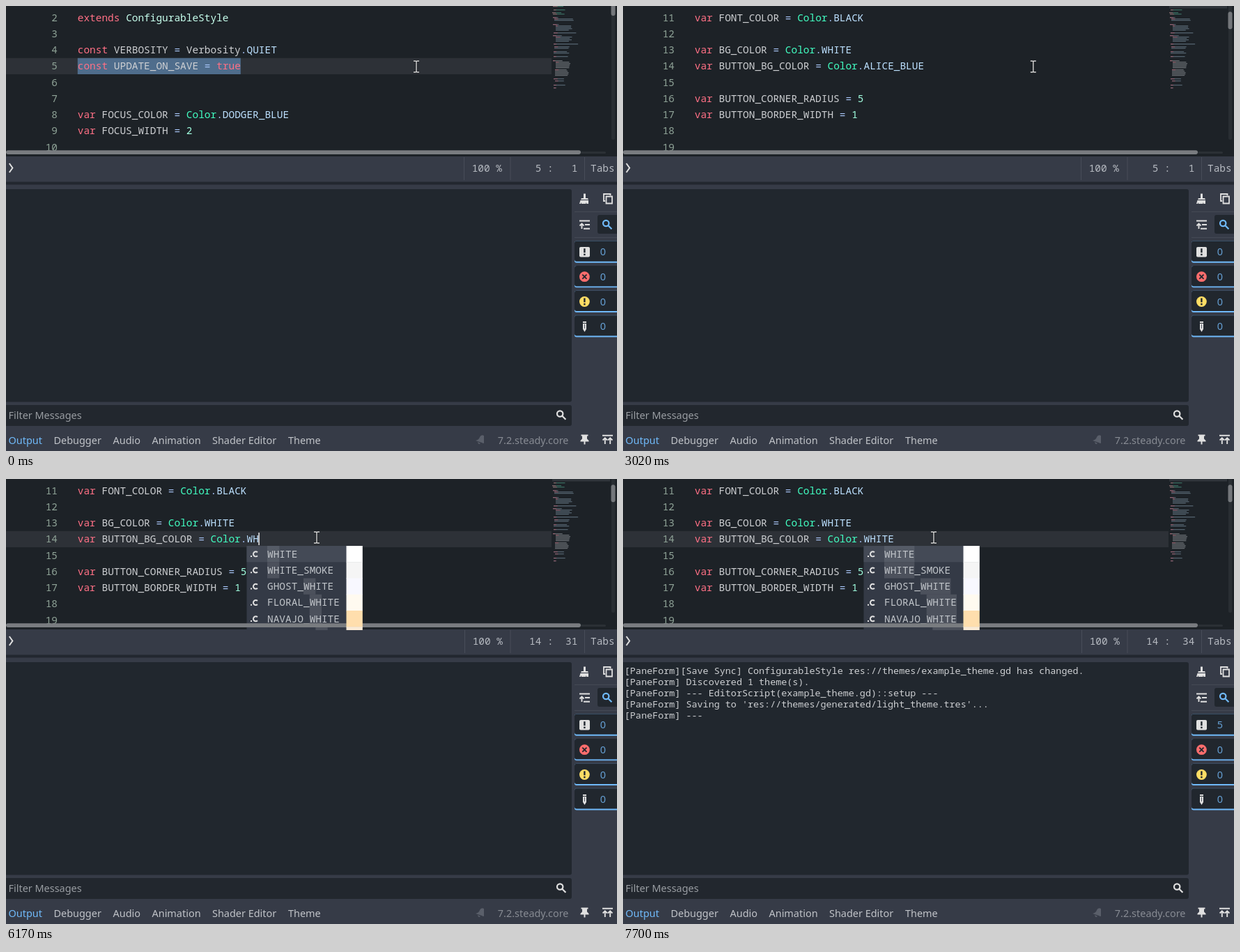
These frames come from a looping animation (877x639 px, 8 s). An HTML page with a canvas:

```html
<!DOCTYPE html>
<html lang="en">
<head>
<meta charset="utf-8">
<title>Theme editor</title>
<style>
html, body { margin: 0; width: 100%; height: 100%; overflow: hidden; background: #363d4a; }
canvas { display: block; }
</style>
</head>
<body>
<canvas id="stage" width="877" height="639"></canvas>
<script>
const ctx = document.getElementById('stage').getContext('2d');
const LOOP = 8000, ROW = 23.25, CHAR = 8.667, CODE_X = 102.8;
const MONO = '"Noto Sans Mono", "DejaVu Sans Mono", monospace';
const CODE = '14.445px ' + MONO, LOG = '13.41px ' + MONO;
const UI = '14.45px "Noto Sans", "Open Sans", sans-serif';
const BASE = '#363b47', EDITOR = '#1d2227', DARK = '#21272e', LINE = '#2d3137';
const TEXT = '#cdcfd2', BLUE = '#70bafa', WHITE = '#e0e0e0';

const SOURCE = [
  '@tool', 'extends ConfigurableStyle', '',
  'const VERBOSITY = Verbosity.QUIET', 'const UPDATE_ON_SAVE = true', '', '',
  'var FOCUS_COLOR = Color.DODGER_BLUE', 'var FOCUS_WIDTH = 2', '',
  'var FONT_COLOR = Color.BLACK', '',
  'var BG_COLOR = Color.WHITE', 'var BUTTON_BG_COLOR = Color.', '',
  'var BUTTON_CORNER_RADIUS = 5', 'var BUTTON_BORDER_WIDTH = 1', '', '', ''
];
const EDITED = 14;
const MESSAGES = [
  '[PaneForm][Save Sync] ConfigurableStyle res://themes/example_theme.gd has changed.',
  '[PaneForm] Discovered 1 theme(s).',
  '[PaneForm] --- EditorScript(example_theme.gd)::setup ---',
  "[PaneForm] Saving to 'res://themes/generated/light_theme.tres'...",
  '[PaneForm] ---'
];
const OPTIONS = [
  ['WHITE', '#ffffff'], ['WHITE_SMOKE', '#f5f5f5'], ['GHOST_WHITE', '#f8f8ff'],
  ['FLORAL_WHITE', '#fffaf0'], ['NAVAJO_WHITE', '#ffdead'], ['ANTIQUE_WHITE', '#faebd7']
];
// Minimap blocks: first y, last y, x, width
const BLOCKS = [
  [0, 1, 785, 20], [5, 6, 786, 20], [9, 9, 784, 14], [11, 12, 785, 20], [16, 16, 785, 8],
  [18, 21, 787, 29], [26, 26, 785, 10], [28, 35, 789, 24], [38, 38, 786, 33],
  [42, 42, 785, 14], [44, 50, 789, 24], [54, 54, 786, 41], [58, 60, 787, 22],
  [65, 67, 786, 25], [72, 73, 786, 24], [78, 78, 785, 14], [80, 88, 789, 23],
  [91, 99, 788, 20], [104, 105, 786, 17], [107, 108, 788, 13], [113, 114, 786, 18], [117, 117, 786, 4]
];

function rect(x, y, w, h, color, radius = 0) {
  ctx.fillStyle = color;
  ctx.beginPath();
  ctx.roundRect(x, y, w, h, radius);
  ctx.fill();
}

function text(str, x, y, color = TEXT, font = CODE, align = 'left') {
  ctx.font = font;
  ctx.fillStyle = color;
  ctx.textAlign = align;
  ctx.fillText(str, x, y);
}

function disc(x, y, r, color) {
  rect(x - r, y - r, 2 * r, 2 * r, color, r);
}

function stroke(path, color = WHITE, width = 2) {
  ctx.strokeStyle = color;
  ctx.lineWidth = width;
  ctx.stroke(new Path2D(path));
}

function fill(path, color = WHITE) {
  ctx.fillStyle = color;
  ctx.fill(new Path2D(path));
}

function clipped(w, h, draw) {
  ctx.save();
  ctx.beginPath();
  ctx.rect(0, 0, w, h);
  ctx.clip();
  draw();
  ctx.restore();
}

function tokenColor(token, prev) {
  if (/^(const|var|extends|true)$/.test(token)) return '#ff7085';
  if (prev === '@' || token === '@') return '#ffb373';
  if (prev === '.') return '#bce0ff';
  if (token === 'Color') return '#42ffc2';
  if (token === 'ConfigurableStyle') return '#c7ffed';
  if (/^\d+$/.test(token)) return '#a1ffe0';
  return /\w/.test(token) ? TEXT : '#abc9ff';
}

function codeLine(str, y) {
  let x = CODE_X, prev = '';
  for (const token of str.match(/\w+|\s+|[^\w\s]/g) || []) {
    text(token, x, y, tokenColor(token, prev));
    x += token.length * CHAR;
    prev = token;
  }
}

function typedWord(t) {
  const steps = [[6310, 'WHITE'], [6240, 'WHI'], [6170, 'WH'], [5840, 'W'], [5450, '']];
  const step = steps.find(([at]) => t >= at);
  return step ? step[1] : 'ALICE_BLUE';
}

function caretOn(t) {
  return t >= 4440 && t < 4850 || t >= 5380 && t < 6770 || t >= 7170 && t < 7700;
}

function minimap(top) {
  let seed = 7;
  const random = () => (seed = seed * 16807 % 2147483647) / 2147483647;
  ctx.globalAlpha = 0.5;
  for (const [y0, y1, x, w] of BLOCKS) {
    for (let y = y0; y <= y1; y += 2) {
      const len = w * (0.75 + 0.25 * random()), head = 3 + 4 * random();
      rect(x, y, len, 1.2, y < 13 ? '#58b89b' : y > 77 && y < 100 ? '#b5bac0' : '#8ba4b8');
      if (y === y0) rect(x, y, Math.min(head, len), 1.2, '#d2667a');
    }
  }
  ctx.globalAlpha = 1;
  if (top === 11) rect(784, 0, 83, 3.5, '#30353b');
}

function popup(word) {
  rect(345.5, 96, 166, 121, '#343a46');
  rect(345.5, 96, 143, ROW, '#444a56');
  OPTIONS.forEach(([name], i) => {
    const y = 96 + i * ROW;
    rect(375 + name.indexOf(word) * CHAR, y, word.length * CHAR, ROW, i ? '#4c515c' : '#555b66');
    text(name, 375, y + 16.6, '#c0c4c9');
    rect(351, y + 14, 2, 2, WHITE);
    ctx.lineWidth = 2;
    ctx.strokeStyle = WHITE;
    ctx.beginPath();
    ctx.arc(358.5, y + 11.8, 3.5, 0.8, Math.PI * 2 - 0.8);
    ctx.stroke();
  });
}

function swatches() {
  OPTIONS.forEach(([, color], i) => rect(488.5, 96 + i * ROW, 23.3, ROW + 0.5, color));
}

function editor(t) {
  const top = t < 1260 ? 2 : t < 1660 ? 5 : t < 2060 ? 8 : 11;
  const editing = t >= 4440, listOpen = t >= 5970, word = typedWord(t);
  const rowY = n => 5.1 + (n - top) * ROW;
  rect(0, 0, 877, 216, EDITOR);
  rect(0, rowY(editing ? EDITED : 5), 783, ROW, LINE);
  if (!editing) rect(CODE_X, rowY(5), 27 * CHAR, ROW, '#4f6d8c');
  for (let n = top - 1; n < top + 9; n++) {
    const y = rowY(n) + 16.6;
    text(String(n), 74, y, '#8fa397', CODE, 'right');
    codeLine(SOURCE[n - 1] + (n === EDITED ? word : ''), y);
  }
  if (caretOn(t)) rect(CODE_X + (28 + word.length) * CHAR - 0.5, 77, 1.6, 18, WHITE);
  minimap(top);
  rect(869, -5, 5, 197, '#292e33', 2.5);
  rect(868.5, -11 + (top - 2) * 2.13, 6, 25, '#74777b', 3);
  if (listOpen) popup(word);
  rect(825, 209, 36, 3, '#2b3035', 1.5);
  rect(0, 207.3, 825, 5.6, '#797c80', 2.8);
  if (listOpen) swatches();
}

function status(t) {
  const editing = t >= 4440, shift = editing ? 1 : 0;
  const column = editing ? 29 + typedWord(t).length : 1;
  stroke('M4.8 226 L9.4 232.5 L4.8 239', WHITE, 2);
  for (const x of [657 + shift, 723.5, 830]) rect(x, 217, 1, 33, '#484d59');
  text('100 %', 668.7 + shift, 237.8, '#b6bac1');
  text((editing ? '14' : ' 5') + ' : ' + String(column).padStart(3), 751, 237.8, '#b6bac1');
  text('Tabs', 839, 237.8, '#b6bac1');
  rect(0, 252.5, 877, 4, '#22272f');
}

function magnifier(x, y, color) {
  stroke(`M${x - 6} ${y - 1.5} a4.2 4.2 0 1 0 8.4 0 a4.2 4.2 0 1 0 -8.4 0 M${x + 1.4} ${y + 1.7} l5 5`, color, 2.2);
}

function toolIcons() {
  fill('M829 269.5 h3 v6.5 h3 l1 2 h-11 l1-2 h3z M824.5 279 h11.5 v5 h-2.5 l-1-2 v2 h-6.5 l-1-2 v2 h-2z');
  stroke('M860 280 h-2 v-10 h9.5 v2', WHITE, 1.8);
  stroke('M861.5 273.5 h8.5 v10 h-8.5z', WHITE, 1.8);
  stroke('M823 308.5 h15 M831 314 h7 M829 319.7 h9 M826.5 320 v-7 M823.5 315.5 l3 -3 l3 3', WHITE, 1.9);
  rect(849, 300, 32, 27, DARK, 3);
  magnifier(863, 313.5, BLUE);
  rect(816, 295, 61, 1, '#454a55');
  rect(816, 332, 61, 1, '#454a55');
}

function counters(t) {
  for (let i = 0; i < 4; i++) {
    const y = 353 + i * 35.6;
    rect(816, y - 15.5, 70, 31.2, BLUE, 3);
    rect(816, y - 15.5, 70, 29.3, DARK, 3);
    text(i === 0 && t >= 7430 ? '5' : '0', 857, y + 5.4, '#659fd3', UI, 'center');
  }
  const bang = (y, color) => {
    rect(829.2, y - 5, 2.4, 6, color);
    rect(829.2, y + 2.5, 2.4, 2.4, color);
  };
  rect(823, 346, 15, 14.5, WHITE, 2);
  bang(353.2, DARK);
  disc(830.4, 388.7, 7.4, '#ff6d6d');
  stroke('M827.3 385.6 l6.2 6.2 m0 -6.2 l-6.2 6.2', DARK, 1.9);
  disc(830.4, 424.5, 7.4, '#ffdd65');
  bang(424.5, DARK);
  fill('M828 453 h5 v2 h-5z M828 456 h5 v8 l-2.5 4 l-2.5 -4z');
  rect(830, 457, 1, 6, '#555b66');
}

function panel(t) {
  rect(0, 263, 812, 305.5, DARK, [0, 3, 3, 0]);
  if (t >= 7430) MESSAGES.forEach((line, i) => text(line, 2, 280 + i * 16, TEXT, LOG));
  toolIcons();
  counters(t);
  rect(0, 573, 812, 30, '#22272e', [0, 3, 3, 0]);
  text('Filter Messages', 3.5, 592.8, '#989ca1', UI);
  magnifier(797, 587, WHITE);
  const tabs = [['Output', 3.5], ['Debugger', 68.5], ['Audio', 153.5], ['Animation', 209.5], ['Shader Editor', 296], ['Theme', 405]];
  tabs.forEach(([name, x], i) => text(name, x, 628.6, i ? '#c0c3c8' : BLUE, UI));
  fill('M674 624 q5 -1 6 -5 q2 -4 6 -2 l0 10 q0 2 -3 0 z M677 626 l4 2 q-3 3 -4 -2z', '#5a5f6a');
  text('7.2.steady.core', 807.5, 628.6, '#878b93', UI, 'right');
  fill('M825.5 615.5 h10 v2 h-1.5 v4 l2.5 2.5 v1.5 h-5 v4 h-2 v-4 h-5 v-1.5 l2.5 -2.5 v-4 h-1.5z');
  stroke('M856 616.8 h15 M859.8 629 v-8 M867.2 629 v-8 M856.6 623.5 l3.2 -3.2 l3.2 3.2 M864 623.5 l3.2 -3.2 l3.2 3.2', WHITE, 1.9);
}

function progressDialog() {
  rect(180, 174, 526, 112, BASE, 3);
  rect(192, 214, 502, 28, DARK, 3);
}

function pointer(t) {
  const tick = 3020 + Math.floor((t - 3020) / 67.5) * 67.5;
  const p = Math.min(1, Math.max(0, (tick - 3000) / 1050));
  const ease = p * p * (3 - 2 * p);
  const x = 589 - 143 * ease, y = 87 - 3 * ease;
  if (t >= 4370 && t < 4510) disc(444.5, 83, 12.3, '#97931c');
  const beam = `M${x - 4} ${y - 8} h3 l1 1 l1 -1 h3 M${x} ${y - 7} v14 M${x - 4} ${y + 8} h3 l1 -1 l1 1 h3`;
  stroke(beam, '#1a1d21', 3);
  stroke(beam, '#d8d8d8', 1.4);
}

function frame(now) {
  const t = now % LOOP;
  rect(0, 0, 877, 639, BASE);
  clipped(877, 217, () => editor(t));
  status(t);
  panel(t);
  if (t >= 7240 && t < 7430) progressDialog();
  pointer(t);
  requestAnimationFrame(frame);
}
requestAnimationFrame(frame);
</script>
</body>
</html>
```
